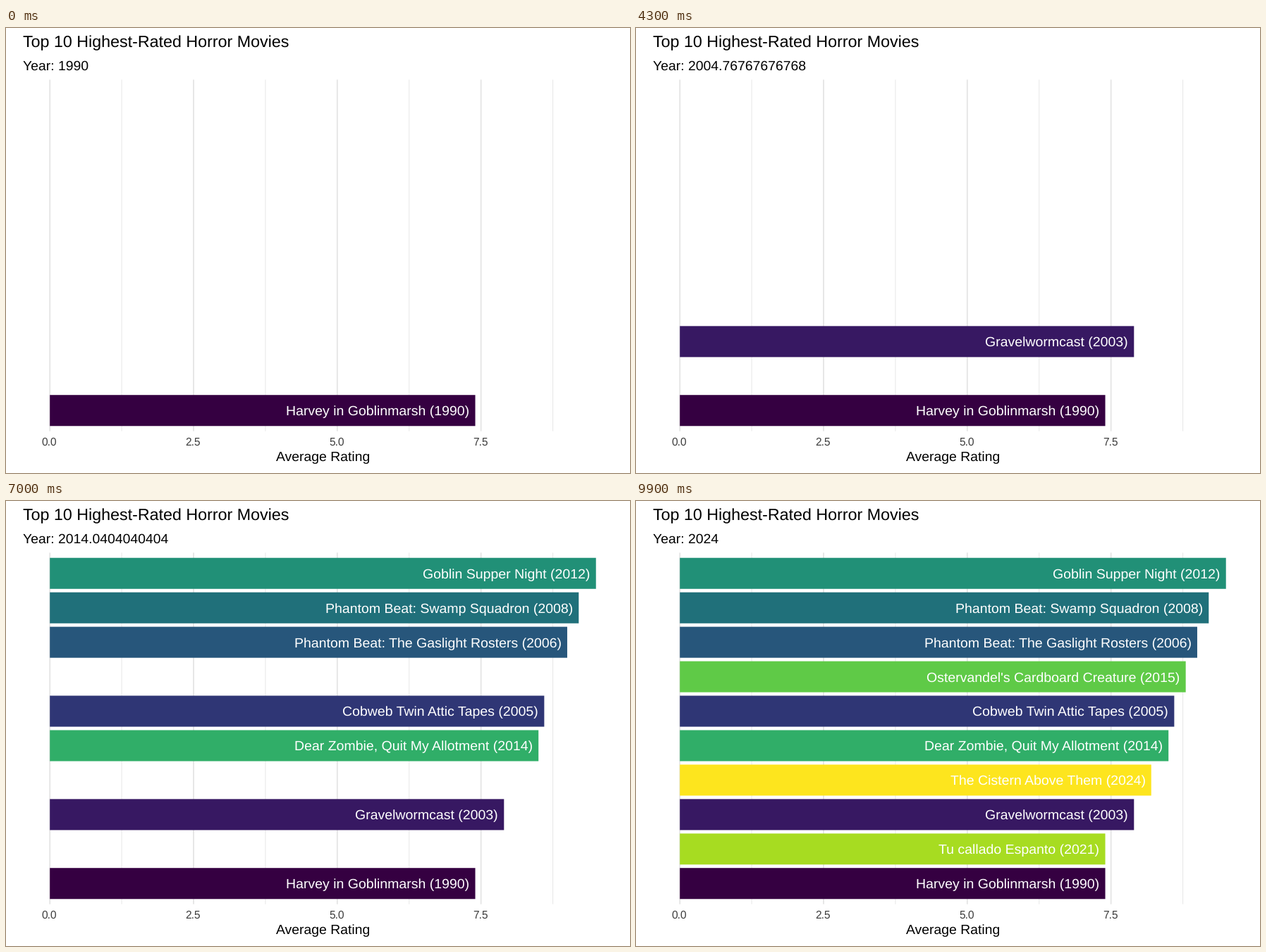
Write a matplotlib script that moves like this. It is 885 px wide and 632 px high and loops after 10 s.

```python
import matplotlib.pyplot as plt
from matplotlib.animation import FuncAnimation
from matplotlib.patches import Rectangle

W, H, DPI = 885, 632, 100
FRAMES, INTERVAL = 100, 100
FIRST_YEAR, LAST_YEAR = 1990, 2024

# Panel geometry in pixels, y pointing down
X0, UNIT = 62.2, 81.53
TOP, BOTTOM = 73.4, 572.6
ROW = (BOTTOM - TOP) / 10.2
TITLE_X = 24.2
BASE = 19.44
LABEL = 19.5
GRID, TICK = "#e6e6e6", "#3c3c3c"

# Title, year, rating, colour, from the top row down
MOVIES = [
    ("Goblin Supper Night", 2012, 9.5, "#219077"),
    ("Phantom Beat: Swamp Squadron", 2008, 9.2, "#20707a"),
    ("Phantom Beat: The Gaslight Rosters", 2006, 9.0, "#27567b"),
    ("Ostervandel's Cardboard Creature", 2015, 8.8, "#5fca47"),
    ("Cobweb Twin Attic Tapes", 2005, 8.6, "#2f3675"),
    ("Dear Zombie, Quit My Allotment", 2014, 8.5, "#30ae68"),
    ("The Cistern Above Them", 2024, 8.2, "#fde51e"),
    ("Gravelwormcast", 2003, 7.9, "#371862"),
    ("Tu callado Espanto", 2021, 7.4, "#a7dc21"),
    ("Harvey in Goblinmarsh", 1990, 7.4, "#350041"),
]

plt.rcParams.update({
    "font.family": "Liberation Sans",
    "text.hinting": "none",
    "toolbar": "None",
})

fig = plt.figure(figsize=(W / DPI, H / DPI), dpi=DPI, facecolor="white")
ax = fig.add_axes([0, 0, 1, 1])
ax.set_xlim(0, W)
ax.set_ylim(H, 0)
ax.axis("off")


def px(value):
    return X0 + UNIT * value


def write(x, y, text, size, color="black", ha="left"):
    return ax.text(x, y, text, fontsize=size * 72 / DPI, color=color,
                   ha=ha, va="baseline", zorder=3)


def grid_line(value, width):
    ax.plot([px(value)] * 2, [TOP, BOTTOM], color=GRID, lw=width * 72 / DPI,
            solid_capstyle="butt", snap=False, zorder=1)


def add_bar(row, title, year, rating, color):
    mid = TOP + ROW * (row + 0.6)
    bar = Rectangle((X0, mid - 0.45 * ROW), UNIT * rating, 0.9 * ROW,
                    facecolor=color, linewidth=0, snap=False, zorder=2)
    ax.add_patch(bar)
    label = write(px(rating - 0.1), mid + 0.36 * LABEL, f"{title} ({year})",
                  LABEL, "white", "right")
    span = LAST_YEAR - FIRST_YEAR
    start = round((year - FIRST_YEAR) / span * (FRAMES - 1))
    return start, bar, label


for k in range(4):
    grid_line(2.5 * k + 1.25, 0.94)
    grid_line(2.5 * k, 1.89)
    # offset by the side bearing of the first digit
    write(px(2.5 * k) - 0.04 * BASE, 592.5, f"{2.5 * k:.1f}",
          0.8 * BASE, TICK, "center")

write(TITLE_X, 27, "Top 10 Highest-Rated Horror Movies", 1.2 * BASE)
write(449.2, 615, "Average Rating", BASE, ha="center")
subtitle = write(TITLE_X, 60, "", BASE)
bars = [add_bar(row, *movie) for row, movie in enumerate(MOVIES)]


def update(i):
    year = FIRST_YEAR + (LAST_YEAR - FIRST_YEAR) * i / (FRAMES - 1)
    subtitle.set_text(f"Year: {year:.15g}")
    for start, bar, label in bars:
        bar.set_visible(i >= start)
        label.set_visible(i >= start)
    return [subtitle]


anim = FuncAnimation(fig, update, frames=FRAMES, interval=INTERVAL,
                     init_func=lambda: update(0), repeat=True, repeat_delay=0)
plt.show()
```
